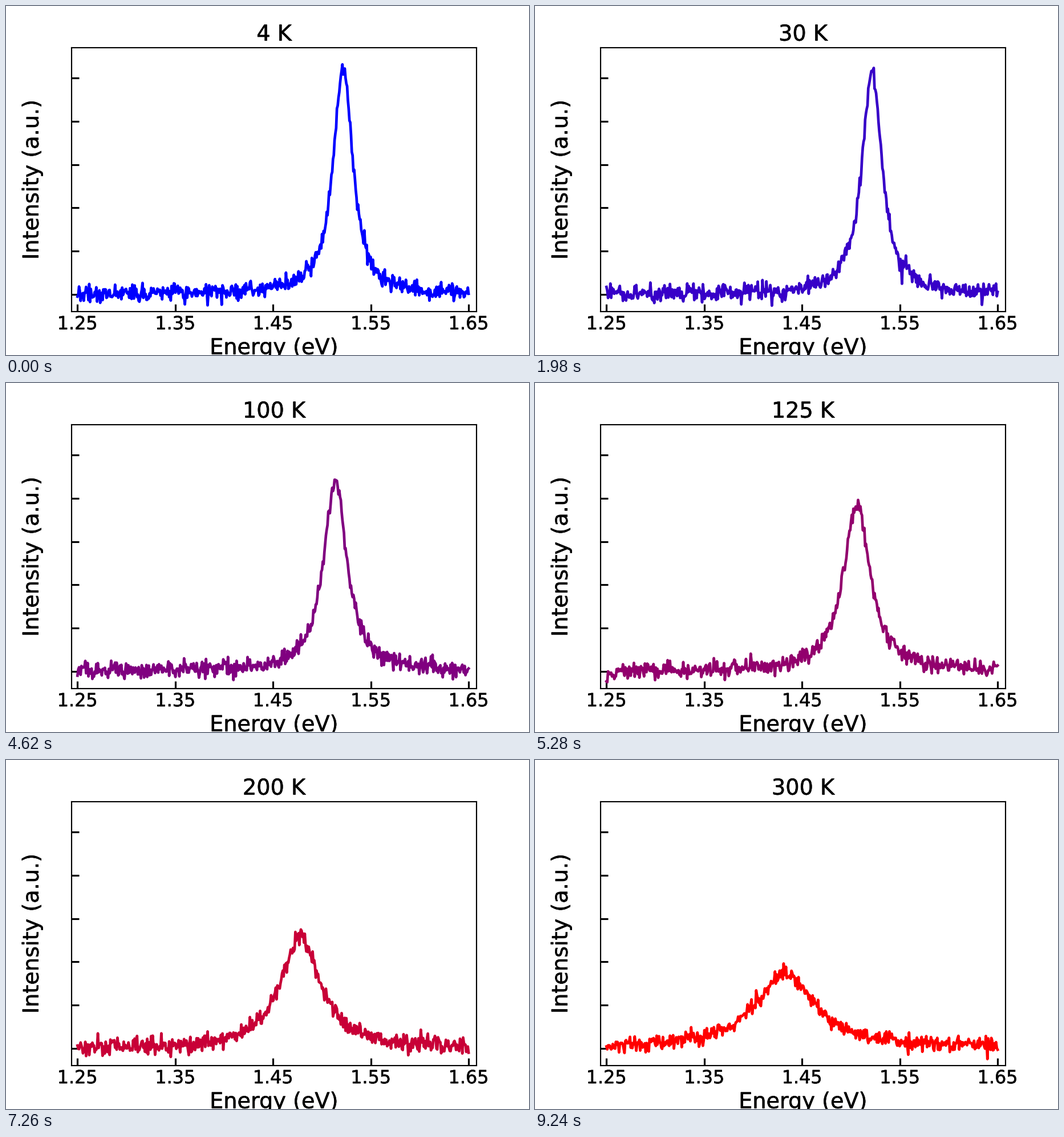
Write a matplotlib script that moves like this. It is 917x611 px and loops after 9900 ms.

```python
import numpy as np
import matplotlib.pyplot as plt
from matplotlib import patheffects
from matplotlib.animation import FuncAnimation

DPI = 152.8
STEP_MS = 660
TEMPS = [4, *range(10, 51, 10), *range(75, 251, 25), 300]
AREA = 0.2
NOISE = 0.1

energy = np.linspace(1.25, 1.65, 500)


def spectrum(temp):
    """Noisy Lorentzian: phonons shift it down and broaden it, area constant."""
    phonons = 1 / np.expm1(300 / temp)
    centre = 1.5215 - 0.1525 * phonons
    width = 0.0122 + 0.043 * phonons
    line = AREA / np.pi * width / ((energy - centre) ** 2 + width**2)
    return line + np.random.default_rng(temp).normal(0, NOISE, energy.size)


spectra = [spectrum(t) for t in TEMPS]

plt.rcParams.update({"font.family": "DejaVu Sans", "axes.linewidth": 1})
fig, ax = plt.subplots(figsize=(917.01 / DPI, 611.01 / DPI), dpi=DPI)
fig.subplots_adjust(left=0.125, right=0.9, bottom=0.125, top=0.88)

ax.set_xlim(1.24376, 1.65828)
ax.set_ylim(-0.397, 5.701)
ax.set_xticks(np.linspace(1.25, 1.65, 5))
ax.xaxis.set_major_formatter("{x:.2f}")
ax.set_yticks(range(6), [])
ax.tick_params(direction="in", length=6, width=1.5, labelsize=15)
ax.set_xlabel("Energy (eV)", fontsize=18)
ax.set_ylabel("Intensity (a.u.)", fontsize=18, labelpad=20)
title = ax.set_title("", fontsize=18)
curve, = ax.plot(energy, spectra[0], lw=2.2)

# Slightly heavier lettering
heavier = [patheffects.withStroke(linewidth=0.25, foreground="black")]
for text in (title, ax.xaxis.label, ax.yaxis.label, *ax.get_xticklabels()):
    text.set_path_effects(heavier)


def update(i):
    mix = i / (len(TEMPS) - 1)
    curve.set_ydata(spectra[i])
    curve.set_color((mix, 0, 1 - mix))
    title.set_text(f"{TEMPS[i]} K")
    return curve, title


anim = FuncAnimation(fig, update, frames=len(TEMPS), interval=STEP_MS,
                     repeat=True, repeat_delay=0)
plt.show()
```
